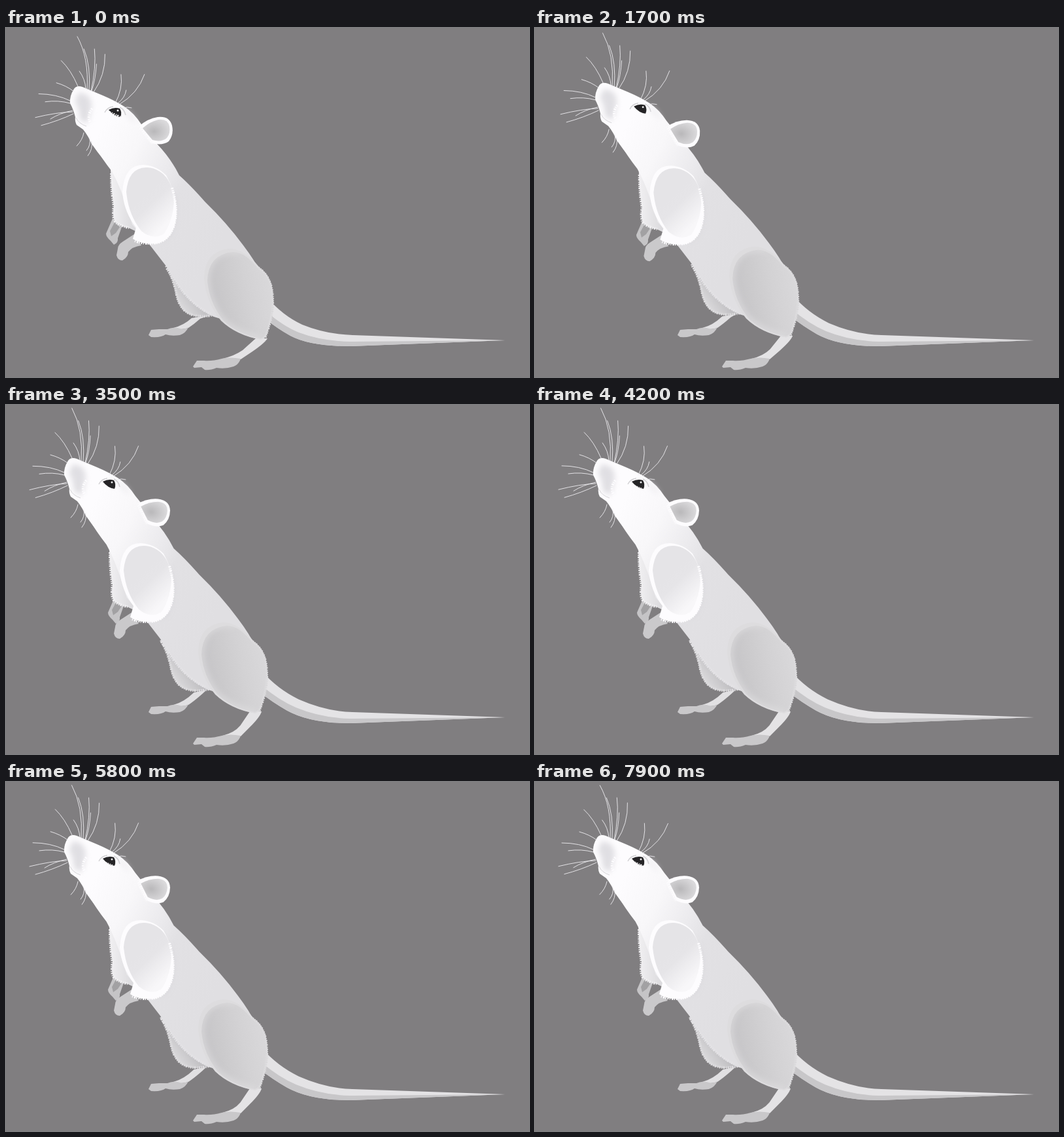
An HTML page for the animation above (8 s loop, 800 px wide and 533 px high).

```html
<!DOCTYPE html>
<html lang="en">
<head>
<meta charset="utf-8">
<title>White rat</title>
<style>
html, body { margin: 0; width: 100%; height: 100%; overflow: hidden; background: #807e80; }
svg { display: block; width: 100vw; height: 100vh; }
.fur { fill: none; stroke-width: 4; stroke-dasharray: 2 1.6 1.4 1.2 2.4 2 1.2 1.5; }
</style>
</head>
<body>
<svg viewBox="0 0 800 533">
  <defs>
    <linearGradient id="coat" gradientUnits="userSpaceOnUse" x1="130" y1="180" x2="345" y2="300">
      <stop offset="0" stop-color="#fdfcfe"/><stop offset=".25" stop-color="#f8f7f9"/>
      <stop offset=".48" stop-color="#ebeaed"/><stop offset=".62" stop-color="#e2e1e4"/>
      <stop offset="1" stop-color="#e0dfe2"/>
    </linearGradient>
    <linearGradient id="sleeve">
      <stop offset="0" stop-color="#f1f0f2"/><stop offset="1" stop-color="#d8d7da"/>
    </linearGradient>
    <linearGradient id="arm" gradientUnits="userSpaceOnUse" x1="212" y1="255" x2="250" y2="295">
      <stop offset="0" stop-color="#e5e4e7"/><stop offset=".3" stop-color="#e6e5e8"/>
      <stop offset="1" stop-color="#f8f7f9"/>
    </linearGradient>
    <linearGradient id="hip" gradientUnits="userSpaceOnUse" x1="308" y1="415" x2="405" y2="395">
      <stop offset="0" stop-color="#c4c3c6"/><stop offset=".3" stop-color="#cbcacc"/>
      <stop offset=".65" stop-color="#d3d2d4"/><stop offset="1" stop-color="#d9d8da"/>
    </linearGradient>
    <linearGradient id="thigh" gradientUnits="userSpaceOnUse" x1="258" y1="418" x2="285" y2="398">
      <stop offset="0" stop-color="#dddcde"/><stop offset="1" stop-color="#bdbcbf"/>
    </linearGradient>
    <radialGradient id="ear" cx=".42" cy=".55" r=".6">
      <stop offset="0" stop-color="#b9b8ba"/><stop offset="1" stop-color="#dbdadc"/>
    </radialGradient>
    <filter id="soft" x="-30%" y="-30%" width="160%" height="160%"><feGaussianBlur stdDeviation="4"/></filter>
    <clipPath id="eyeClip"><path id="eyeShape" d="M157 125Q166 120 174 123Q178 129 175 136Q165 135 157 125Z"/></clipPath>
    <clipPath id="hipClip"><path id="hipShape" d="M388 366Q365 337 341 337Q304 341 303 382Q306 419 329 447Q352 469 390 476Q399 474 401 462Q412 432 408 402Q405 378 388 366Z"/></clipPath>
  </defs>

  <path id="tail" fill="#e4e3e5"/>
  <path id="tailShade" fill="#c8c7c9"/>

  <path id="farLeg" fill="#e1e0e2"/>
  <path fill="#c9c8ca" d="M218 469L222 461L234 460L247 460Q258 456 266 459Q273 461 279 457Q275 466 266 469Q254 471 244 468Q238 473 222 472Z"/>
  <path id="nearLeg" fill="#e4e3e5"/>
  <path fill="#c9c8ca" d="M286 517L292 508L303 508Q315 509 330 505Q342 502 359 505Q356 514 348 517Q336 521 322 519Q312 523 304 522L299 518L288 519Z"/>

  <g id="farThigh">
    <path fill="url(#thigh)" d="M244 360Q256 385 260 408Q266 432 282 438Q298 444 320 438L290 385Z"/>
    <path class="fur" stroke="#dddcde" d="M245 363Q257 385 261 408Q266 430 282 437Q298 443 318 438"/>
  </g>

  <g id="farHand">
    <path fill="#c5c4c6" d="M163 291L153 314Q153 319 160 325L165 331Q172 328 171 321L177 304Z"/>
    <path fill="#a2a1a3" d="M166 297L159 310L161 318L168 313L174 304Z"/>
  </g>
  <g id="farArm">
    <path fill="url(#sleeve)" d="M160 214Q161 250 165 272Q162 290 168 297Q177 304 187 305L202 312L200 230Z"/>
    <path class="fur" stroke="#f1f0f2" stroke-width="3" d="M161 222Q161 250 165 272Q162 290 168 297Q177 303 188 305"/>
  </g>

  <g id="body">
    <path fill="url(#coat)" d="M200 145L231 177Q252 199 265 225Q283 241 304 265Q338 298 363 332Q382 357 390 375L380 460L318 441Q298 432 280 414Q264 397 246 365L222 334L193 300Q179 250 162 219Q147 200 134 178Z"/>
    <path class="fur" stroke="#e4e3e6" d="M246 367Q264 397 280 413Q296 429 314 437"/>
  </g>

  <g id="head">
    <path fill="url(#coat)" d="M104 93Q108 87 117 90L148 103Q167 111 181 120Q196 130 207 147L228 173L150 202Q140 190 131 177Q126 165 118 155L108 148Q105 142 106 136Q103 124 98 115Q97 104 104 93Z"/>
    <g filter="url(#soft)">
      <path fill="#e0dfe3" d="M111 98L124 102Q133 111 130 124L125 146L113 140Q112 121 105 112Z"/>
      <path fill="#ecebee" d="M176 123L188 129L200 144L192 141Z"/>
    </g>
    <path class="fur" stroke="#fdfcfe" d="M132 123Q126 130 127 139L132 153"/>
    <path fill="none" stroke="#d6d5d8" d="M107 137Q111 146 123 150"/>
    <path fill="none" stroke="#d3d2d5" stroke-width="1.5" d="M151 129Q155 121 164 120M174 121Q181 124 183 133"/>
    <use href="#eyeShape" fill="#252426"/>
    <circle cx="171" cy="126" r="1.5" fill="#eee"/>
    <g clip-path="url(#eyeClip)"><g id="lid">
      <path fill="#fbfafc" d="M150 128L181 143V158H150Z"/>
      <path class="fur" stroke="#fbfafc" d="M152 128L181 141"/>
    </g></g>
    <g id="whiskers" fill="none" stroke="#eeedf0" stroke-width=".9" stroke-linecap="round"></g>
  </g>

  <g id="earPart">
    <path fill="#fdfcfe" d="M202 151Q217 138 232 136Q250 134 254 149Q257 163 249 173Q240 180 222 176Q211 164 202 151Z"/>
    <path fill="url(#ear)" d="M209 153Q220 143 233 140Q247 138 250 150Q252 161 246 168Q238 175 224 171Z"/>
    <path class="fur" stroke="#f8f7f9" d="M203 151Q212 158 214 166L224 177"/>
  </g>

  <g id="hipPart">
    <use href="#hipShape" fill="#dddcde"/>
    <path fill="url(#hip)" d="M386 368Q366 342 347 342Q309 346 308 386Q311 420 333 447Q354 467 390 474Q399 470 400 458Q409 430 406 401Q402 378 386 368Z"/>
    <g clip-path="url(#hipClip)">
      <path fill="none" stroke="#dddcde" stroke-width="6" filter="url(#soft)" d="M360 342Q309 336 308 386Q311 420 333 447Q354 467 390 474"/>
    </g>
    <path class="fur" stroke="#dad9db" d="M386 366Q404 379 407 402Q411 432 400 462L396 474"/>
  </g>

  <g id="armPart">
    <path fill="#cac9cb" d="M196 315L179 326Q171 331 171 337L169 347Q171 355 178 355Q187 350 187 342Q193 334 207 332Z"/>
    <path fill="#cfced1" filter="url(#soft)" opacity=".55" d="M253 245Q268 280 250 318L235 326Z"/>
    <path fill="#fdfcfe" d="M211 209Q181 208 178 250Q180 280 199 305L194 322Q207 331 231 329Q255 324 260 291Q264 259 245 225Q230 210 211 209Z"/>
    <path fill="url(#arm)" d="M214 213Q187 214 184 250Q187 285 207 310Q225 325 242 314Q258 290 257 255Q251 229 235 219Q224 212 214 213Z"/>
    <path class="fur" stroke="#fdfcfe" d="M254 244Q263 274 258 297Q252 323 231 328Q212 331 197 325"/>
  </g>
</svg>
<script>
const $ = id => document.getElementById(id);
const LOOP = 8000, STEP = 100;

// root, bend and tip of each whisker
const whiskers = [
  "124 95Q127 45 109 13", "127 96Q130 58 119 32", "130 97Q138 60 135 32", "134 98Q152 72 151 40",
  "122 93Q121 78 112 66", "131 96Q137 78 138 55", "110 89Q99 64 84 50", "104 97Q92 88 77 84",
  "98 111Q77 101 50 101", "98 115Q80 110 60 113", "102 128Q77 129 45 137", "103 131Q80 142 54 149",
  "102 126Q82 130 68 139", "167 115Q179 93 176 71", "173 117Q202 100 212 71", "171 115Q182 107 184 95",
  "179 122Q186 120 192 122", "119 160Q117 171 108 180", "128 168Q130 179 123 187", "131 173Q133 185 125 195"
];
$("whiskers").innerHTML = whiskers.map(w => `<path d="M${w}"/>`).join("");
const hairs = [...$("whiskers").children];

const lidKeys = [[0, .55], [1200, .2], [2500, 0], [3500, .15], [5000, .55], [6600, .22], [8000, .45]];

const ease = u => { u = Math.min(1, Math.max(0, u)); return u * u * (3 - 2 * u); };

function lidAt(t) {
  const i = lidKeys.findIndex(key => key[0] > t);
  const [t0, a] = lidKeys[i - 1], [t1, b] = lidKeys[i];
  return a + (b - a) * (t - t0) / (t1 - t0);
}

function draw(t) {
  const k = ease((t - 1250) / 750);
  const move = (id, x, y, more = "") => $(id).setAttribute("transform", `translate(${x * k} ${y * k}) ${more}`);
  const path = (id, d) => $(id).setAttribute("d", d);
  const p = (x, y, part = 1) => `${x - 9 * k * part} ${y - 6 * k * part} `;

  move("body", -8.5, -6);
  move("head", -9, -8);
  move("earPart", -4, 7, `rotate(${13 * k} 232 156)`);
  move("hipPart", -9, -5);
  move("farThigh", -8, -4);
  move("armPart", -4, 2);
  move("farArm", -2, 3);
  move("farHand", 3, 3);

  path("tail", `M${p(400, 412)}Q${p(423, 439, .9)}${p(453, 453, .6)}Q490 468 530 469L763 477L527 486Q465 486 ${p(435, 470, .6)}Q${p(415, 459)}${p(398, 445)}Z`);
  path("tailShade", `M${p(398, 433)}Q${p(425, 456, .8)}${p(448, 465, .5)}Q482 478 527 479L763 477L527 486Q465 486 ${p(435, 470, .6)}Q${p(415, 459)}${p(398, 445)}Z`);

  const knee = 7 * k;
  path("farLeg", `M256 458Q272 454 ${284 + knee / 2} ${443 - 4 * k}L${314 - knee} ${438 - 3 * k}L${297 + knee / 2} ${444 - 3 * k}Q288 452 279 458Q267 462 256 458Z`);
  path("nearLeg", `M331 505Q349 501 ${p(362, 492, .4)}L${p(382, 474)}L${p(400, 474)}Q${p(396, 481, .8)}${p(377, 494, .4)}L359 506Q346 503 331 505Z`);

  $("lid").setAttribute("transform", `translate(0 ${3 - 9 * lidAt(t)})`);
  hairs.forEach((h, i) => {
    const [x, y] = whiskers[i].split(/[ Q]/);
    h.setAttribute("transform", `rotate(${.6 * Math.sin(t / 130 + i * .25)} ${x} ${y})`);
  });
}

function tick(now) {
  draw(Math.floor(now % LOOP / STEP) * STEP);
  requestAnimationFrame(tick);
}
requestAnimationFrame(tick);
</script>
</body>
</html>
```
